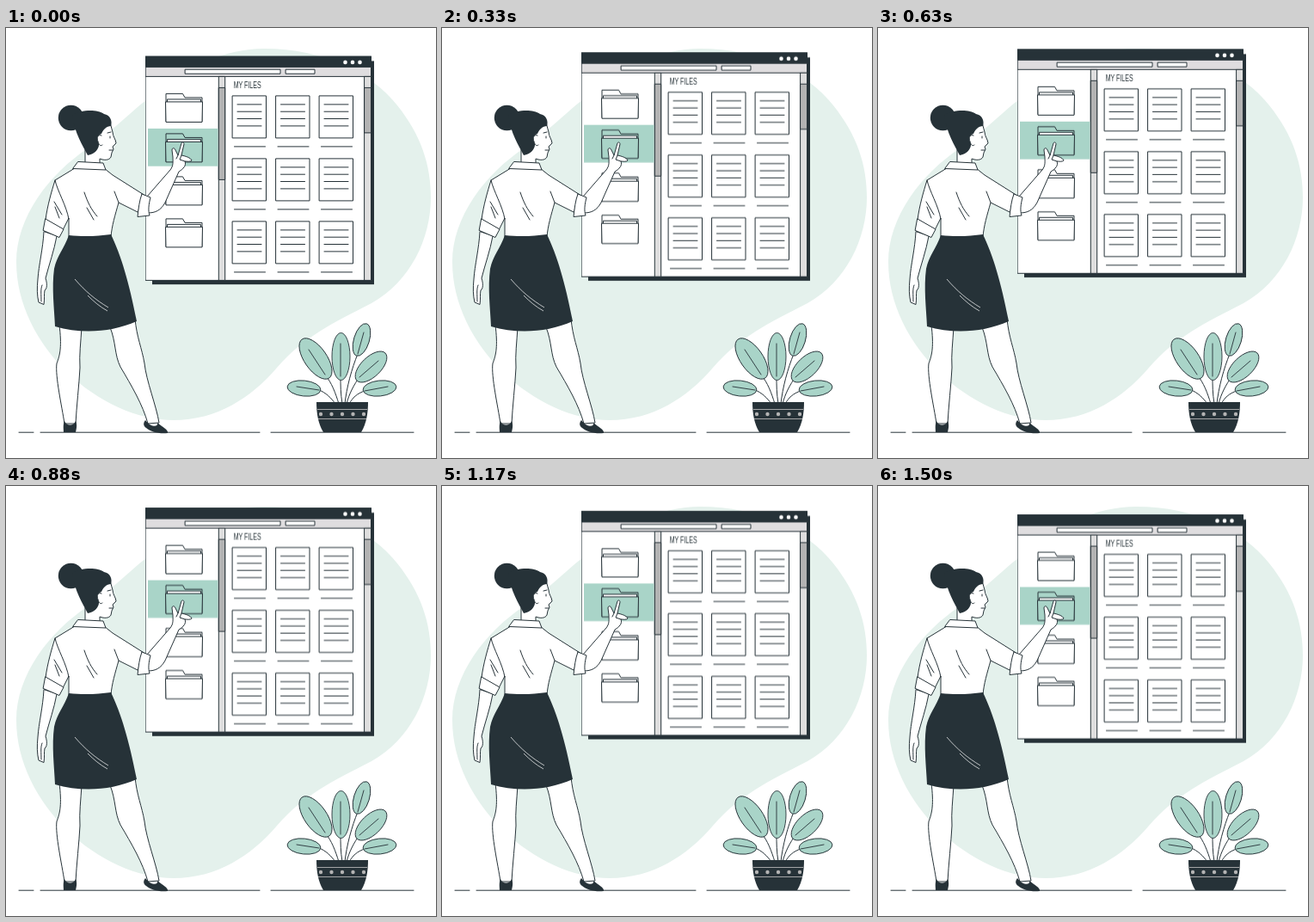
Animation of 500x500 px, one loop 1540 ms. Source, as an HTML page without scripts:

```html
<!DOCTYPE html>
<html lang="en">
<head>
<meta charset="utf-8">
<title>My files</title>
<style>
  html, body { margin: 0; width: 100%; height: 100%; overflow: hidden; background: #fff; }
  svg { display: block; width: 100%; height: 100%; }
  .ink { fill: #263238; }
  .mint { fill: #a9d4c8; }
  .line { fill: none; stroke: #263238; stroke-linecap: round; stroke-linejoin: round; }
  .shape { fill: #fff; stroke: #263238; stroke-linecap: round; stroke-linejoin: round; }
  .leaf { fill: #a9d4c8; stroke: #263238; stroke-width: .9; }
  .label { font: 11px "Liberation Sans", Arial, sans-serif; }
  .window { animation: float 1540ms linear -45ms infinite; }
  @keyframes float { 50% { transform: translateY(-10px); } }
</style>
</head>
<body>
<svg viewBox="0 0 500 500">
  <defs>
    <g id="folder" stroke="#263238" stroke-linejoin="round">
      <path d="M.5 33V.5H20L22.500 5H42.500V33Z"/>
      <path d="M2 11V7H41V11" fill="#fff"/>
      <path d="M0 10H43L42.500 33.500H.5Z"/>
    </g>
    <g id="page">
      <rect class="shape" width="39" height="49"/>
      <path class="line" d="M5.500 10H33.500M5.500 18.300H33.500M5.500 26.600H33.500M5.500 35H33.500M2 59H38"/>
    </g>
    <g id="row">
      <use href="#page"/>
      <use href="#page" x="50.500"/>
      <use href="#page" x="101"/>
    </g>
  </defs>

  <path fill="#e4f1ec" d="M300 24C370 24 425 52 455 90C483 125 494 160 494 197C494 245 470 295 425 320C380 343 345 360 315 395C285 430 245 456 195 456C110 456 12 370 12 272C12 220 50 170 95 140C130 115 150 92 175 75C210 45 255 24 300 24Z"/>
  <path class="line" d="M15 470.200H32M40 470.200H295M308 470.200H474"/>

  <g class="window">
    <rect class="ink" x="170" y="39" width="258" height="260"/>
    <rect class="shape" x="162.500" y="33.500" width="262" height="260.500"/>
    <rect class="ink" x="162" y="33" width="263" height="13"/>
    <g fill="#fff">
      <circle cx="394.500" cy="40.500" r="2.300"/>
      <circle cx="403" cy="40.500" r="2.300"/>
      <circle cx="411.500" cy="40.500" r="2.300"/>
    </g>
    <rect class="line" x="162.500" y="46" width="262" height="11" style="fill:#dfdddf"/>
    <rect class="shape" x="208.500" y="48.800" width="110.500" height="5"/>
    <rect class="shape" x="325.500" y="48.800" width="33.500" height="5"/>
    <g class="line">
      <rect x="247.700" y="57" width="7" height="237" fill="#dedede"/>
      <rect x="247.700" y="70" width="7" height="107" fill="#b3b3b3"/>
      <rect x="417" y="57" width="7.500" height="237" fill="#dedede"/>
      <rect x="417" y="70" width="7.500" height="52.500" fill="#b3b3b3"/>
    </g>
    <rect class="mint" x="165" y="117.500" width="81.500" height="43.800"/>
    <use href="#folder" x="185.500" y="76.500" fill="#fff"/>
    <use href="#folder" x="185.500" y="123" class="mint"/>
    <use href="#folder" x="185.500" y="173" fill="#fff"/>
    <use href="#folder" x="185.500" y="222" fill="#fff"/>
    <text class="label ink" transform="translate(264.700 71) scale(.64 1)">MY FILES</text>
    <use href="#row" x="263.500" y="79.500"/>
    <use href="#row" x="263.500" y="152.500"/>
    <use href="#row" x="263.500" y="225.500"/>
  </g>

  <g class="woman">
    <!-- legs and shoes -->
    <path class="shape" d="M62 345C65 370 63 380 59 390C57 405 65 440 68 460H81C82 440 85 415 86 395C85 380 87 365 88 348Z"/>
    <path class="shape" d="M121 348C128 365 126 380 133 394C146 416 159 438 165 460L178 459C175 440 163 410 161 390C158 372 152 360 150 338Z"/>
    <path class="ink" d="M68 457C66 462 67 466 67 470H81C82 466 83 461 81 457C79 463 70 463 68 457Z"/>
    <path class="ink" d="M162 456C159 460 160 463 163 465C169 470 178 472 188 471C189 467 182 464 176 459C177 465 168 464 162 456Z"/>

    <!-- hanging arm -->
    <path class="shape" d="M44 237C43 257 38 276 37 292C36 302 36 311 38 319L44 321.500C45 315 44 310 45 305C48 303 48 297 46 291C50 275 56 259 59 242Z"/>
    <path class="line" d="M42 299C40 304 41 309 41 318"/>

    <!-- raised arm -->
    <path class="shape" d="M164 196L191 165C195 160 194 155 194 150L193 142C193 139 196 139 197 142L200 148L204 134C205 132 207 133 207 135L204 148C209 149 215 151 216 154C214 156 211 155 208 155C210 160 206 164 201 167L185 203C180 212 174 215 165 215Z"/>
    <path class="line" d="M200 148L198 152M204 148L202 153L208 155"/>

    <!-- blouse -->
    <path class="shape" d="M80 163L57 177C53 190 48 207 46 223L66 235L73 221L73 243H122C123 230 127 217 131 203L153 214L162 195L124 171L114 163Z"/>
    <path class="shape" d="M46 222L67 234L62 243.500L43.500 235.500Z"/>
    <path class="shape" d="M158 193L168 197C166 205 165 212 167 218L153 219.500C154 210 155 201 158 193Z"/>
    <path class="line" d="M57 177C60 190 70 206 73 222M131 203L126 190M56 202L65 217M57 208L62 221M91 191C95 203 99 211 106 219M94 209L102 223"/>

    <!-- head -->
    <path class="shape" d="M92 142V159H109V152C114 154 120 154 122 150L123 145L125 141L124 138L128 134C128 130 124 126 124 121L121 110L105 112Z"/>
    <path class="shape" d="M84 155.500L113 157L116 165L78 163.500Z"/>
    <path class="line" d="M121 126V128M118 122L122 121M120 142H124"/>
    <circle class="ink" cx="75.500" cy="104.500" r="14.700"/>
    <path class="ink" d="M77 101C87 95 106 94 114 100C121 101 124 108 122 114C117 114 113 118 111 123C107 124 106 129 108 134C109 140 103 147 95 148C89 136 80 123 77 101Z"/>
    <path class="shape" d="M111 125C107 123 105 128 107 132C108 136 110 138 112 136"/>

    <!-- skirt -->
    <path class="ink" d="M73 241C91 243 107 242 122 240C134 265 143 295 152 341C122 354 88 356 57 347C56 326 53 302 56 280C59 265 68 256 73 241Z"/>
    <path d="M80 292C92 306 104 316 119 325M95 311C102 318 109 324 118 329" fill="none" stroke="#fff" stroke-width=".7"/>
  </g>

  <g class="plant">
    <path class="line" d="M387 437C383 424 379 413 371 403M391 437C389 425 389 415 389 405M394 437C396 418 402 396 409 379M396 437C399 425 405 414 411 406M383 437C378 430 372 424 364 421M399 437C403 430 408 425 417 422"/>
    <ellipse class="leaf" cx="360" cy="384.500" rx="13" ry="27.500" transform="rotate(-35 360 384.500)"/>
    <ellipse class="leaf" cx="413.500" cy="362.500" rx="9" ry="19.500" transform="rotate(17 413.500 362.500)"/>
    <ellipse class="leaf" cx="424.500" cy="394" rx="11.500" ry="23" transform="rotate(46 424.500 394)"/>
    <ellipse class="leaf" cx="389.500" cy="382" rx="10.500" ry="27.500"/>
    <ellipse class="leaf" cx="346.500" cy="419" rx="19.500" ry="9" transform="rotate(6 346.500 419)"/>
    <ellipse class="leaf" cx="434.500" cy="419" rx="19.500" ry="9" transform="rotate(-6 434.500 419)"/>
    <path class="line" stroke-width=".9" d="M371 403L352 374M389 405V367M409 379L416 354M411 406L433 387M364 421L338 417M417 422L444 417"/>
    <path class="ink" d="M361 435H421C421 448 419 460 413 470H369C363 460 361 448 361 435Z"/>
    <path d="M362 443.500H420M363 454.500H419" stroke="#b3b3b3" stroke-width=".9"/>
    <path d="M366 449H418" stroke="#b3b3b3" stroke-width="4.400" stroke-linecap="round" stroke-dasharray="0 12.500"/>
  </g>
</svg>
</body>
</html>
```
